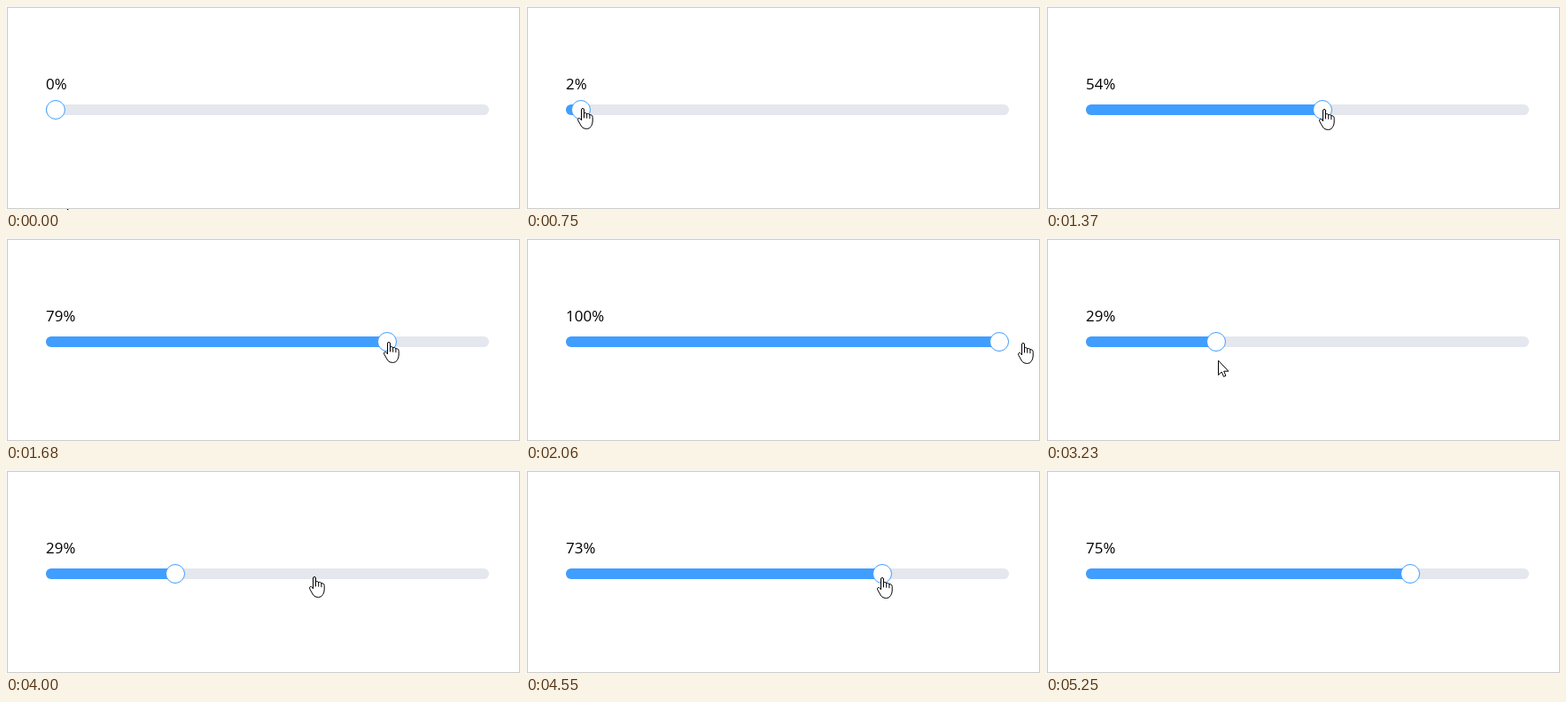
These frames come from a looping animation (580x230 px, 5.78 s). An HTML page:

```html
<!DOCTYPE html>
<html lang="en">
<head>
<meta charset="utf-8">
<title>Slider</title>
<style>
  html, body { margin: 0; width: 100%; height: 100%; overflow: hidden; background: #fff; }
  svg { display: block; }
  text { font: 17px "Open Sans", "Noto Sans", sans-serif; fill: #000; }
  .cursor { fill: #fff; stroke: #000; stroke-linejoin: round; stroke-linecap: round; }
</style>
</head>
<body>
<svg width="580" height="230" viewBox="0 0 580 230">
  <rect x="1.5" y="1.5" width="578" height="227" fill="#fff" stroke="#c8c8c8"/>
  <text id="label" x="45" y="94">0%</text>
  <rect x="45" y="111" width="500" height="12" rx="6" fill="#e4e7ed"/>
  <rect id="fill" x="45" y="111" width="11" height="12" rx="6" fill="#409eff"/>
  <circle id="thumb" cx="56" cy="117" r="10.5" fill="#fff" stroke="#409eff"/>
  <g id="hand" class="cursor">
    <path d="M-1.5 13.5V2Q-1.5 .5 0 .5T1.5 2V6.5Q2 5.5 3.2 5.6Q4.6 5.8 4.7 7Q5.4 6.2 6.5 6.5Q7.8 6.8 7.9 8Q8.8 7.4 9.9 8Q11.2 8.7 11.2 10.5V15Q11 18.5 9.5 20.5Q8.3 23.5 4.5 23.5Q.5 23.5-1.3 21L-5 14.5Q-6.2 12.3-4.8 11.6Q-3.5 11.1-2.5 12.3Z"/>
    <path d="M1.5 6.5V11M4.7 7V11.3M7.9 8V11.8" fill="none"/>
  </g>
  <path id="arrow" class="cursor" d="M.5 .5V16.5L4.2 13L6.5 18.3L8.9 17.3L6.7 12.2H11.5Z"/>
</svg>
<script>
const LOOP = 5780, TICK = 77, PHASE = 0.3;
const MIN = 56, MAX = 534;

// Ticks at which the thumb is grabbed, let go and settled
const drag = { grab: 9, release: 42, settle: 44 };
const click = { press: 54, release: 61 };

// Pointer path: tick, x, y
const path = [
  [0, 69, 229], [5, 54, 122], [8, 58, 115], [10, 64, 115], [16, 237, 122],
  [18, 314, 116], [24, 491, 117], [27, 561, 118], [31, 564, 118],
  [39, 291, 140], [42, 194, 138], [43, 194, 138], [49, 347, 122],
  [52, 348, 120], [53, 348, 120], [60, 411, 121], [61, 411, 121], [68, 405, 240]
];

const $ = id => document.getElementById(id);
const [label, fill, thumb, hand, arrow] = ["label", "fill", "thumb", "hand", "arrow"].map($);
const clamp = x => Math.max(MIN, Math.min(MAX, x));
const mix = (a, b, k) => Math.round(a + (b - a) * k);

function pointerAt(tick) {
  const i = path.findIndex(p => p[0] > tick);
  if (i < 0) return path[path.length - 1].slice(1);
  const [t0, x0, y0] = path[i - 1], [t1, x1, y1] = path[i];
  const k = (tick - t0) / (t1 - t0);
  return [mix(x0, x1, k), mix(y0, y1, k)];
}

function thumbAt(tick) {
  if (tick < drag.grab) return MIN;
  if (tick < drag.settle) return clamp(pointerAt(tick)[0] - 2);
  if (tick < click.press) return 191;
  return clamp(pointerAt(Math.min(tick, click.release))[0]);
}

function draw(time) {
  const tick = Math.floor(time / TICK + PHASE);
  const [x, y] = pointerAt(tick);
  const pos = thumbAt(tick);
  const dragging = tick >= drag.grab && tick < drag.release;
  const isHand = dragging || y <= 123;

  label.textContent = Math.ceil((pos - MIN) / (MAX - MIN) * 100) + "%";
  fill.setAttribute("width", pos - 45);
  thumb.setAttribute("cx", pos);
  for (const el of [hand, arrow]) {
    el.setAttribute("transform", `translate(${x} ${y})`);
    el.style.display = (el === hand) === isHand ? "" : "none";
  }
}

function frame() {
  draw(performance.now() % LOOP);
  requestAnimationFrame(frame);
}
frame();
</script>
</body>
</html>
```
